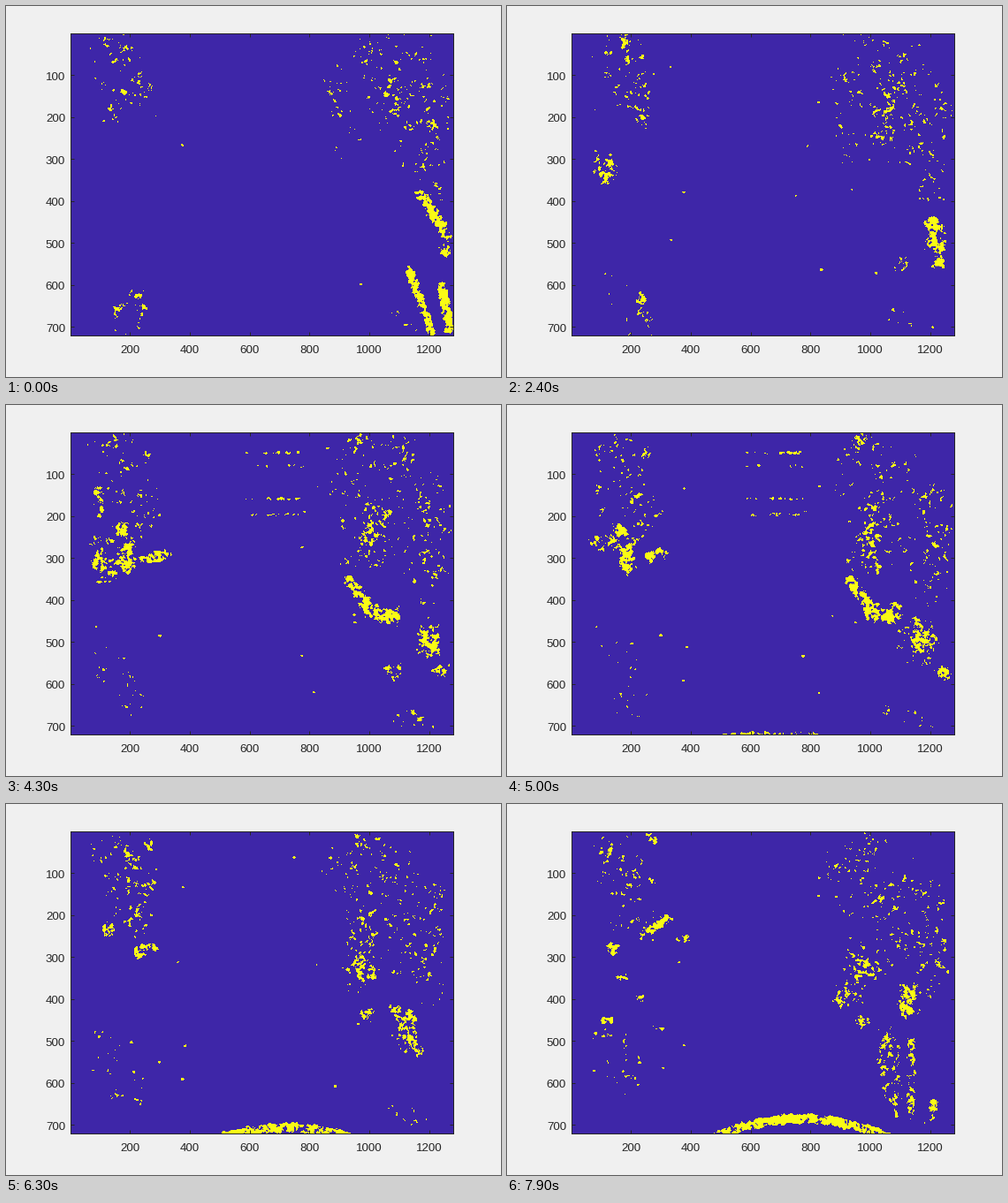
A matplotlib script for the animation above (8 s loop, 560 px wide and 420 px high).

```python
import numpy as np
import matplotlib.pyplot as plt
from matplotlib.animation import FuncAnimation
from matplotlib.colors import ListedColormap
from matplotlib.transforms import ScaledTranslation

FRAMES, STEP, END = 80, 100, 8
LEFT, TOP, W, H = 73, 31, 433, 342
FADE = 0.6      # seconds a patch needs to appear or vanish
DRIFT = 0.9     # seconds between independent noise fields

plt.rcParams["font.family"] = "Liberation Sans"
rng = np.random.default_rng(12)
xs = np.arange(W) + LEFT + .5
ys = np.arange(H) + TOP + .5
patches = []


def patch(t0, t1, path, r, d, tail=(0, 0), fade=FADE):
    """Rounded patch of density d whose start runs evenly along path."""
    patches.append((t0, t1, np.array(path, float), r, d, tail, fade))


def smooth(u):
    u = np.clip(u, 0, 1)
    return u * u * (3 - 2 * u)


# loose speckle on both sides
patch(0, END, [(432, 60), (405, 75)], 42, .05, tail=(45, 75))
patch(0, END, [(448, 65), (393, 165)], 16, .16, tail=(-8, 50))
patch(0, END, [(480, 100)], 16, .06, tail=(0, 110))
patch(0, END, [(375, 85), (388, 95)], 15, .03, tail=(15, 85))
patch(0, END, [(435, 350)], 9, .05, tail=(40, 8))
patch(0, END, [(122, 45), (125, 60)], 24, .06, tail=(25, 70))
patch(0, END, [(125, 335), (115, 260)], 20, .025, tail=(25, 50))

# right side
patch(0, .6, [(469, 212)], 5.5, .8, tail=(31, 50))
patch(0, .6, [(456, 300)], 4.5, .85, tail=(25, 68))
patch(0, .4, [(494, 318)], 5, .9, tail=(8, 48))
patch(.9, END, [(490, 236), (482, 255), (477, 256), (454, 246), (455, 212)],
      11, .6, tail=(2, 18))
patch(0, 5.2, [(495, 278), (489, 291), (494, 305)], 7.5, .6)
patch(.7, 4.2, [(456, 297), (448, 293), (440, 300)], 9, .45)
patch(3, 6.8, [(399, 40)], 7, .32, tail=(2, 8))
patch(3.3, 5.3, [(389, 199)], 6, .72, tail=(23, 32))
patch(4.4, 5.5, [(412, 235)], 8.5, .8, tail=(26, 5))
patch(3, END, [(416, 246), (412, 236), (402, 248)], 7, .5)
patch(4.8, END, [(438, 226), (442, 236), (450, 215)], 7, .5)
patch(4.9, 6.3, [(450, 258)], 14, .12, tail=(18, 25))
patch(5.8, END, [(395, 185)], 11, .38, tail=(16, 4))
patch(7.3, END, [(457, 268)], 4, .45, tail=(0, 82))
patch(7.3, END, [(430, 265)], 11, .15, tail=(8, 85))
patch(7.3, END, [(483, 338)], 4.5, .7, tail=(0, 6))

# left side
patch(0, 2.4, [(132, 38)], 7, .25, tail=(4, 8))
patch(0, 3, [(152, 328)], 6, .25, tail=(2, 25))
patch(1.9, 4, [(110, 174)], 10, .62, tail=(4, 17))
patch(2.9, 4.6, [(104, 96)], 5, .4, tail=(2, 26))
patch(3.2, 4.2, [(98, 179)], 4, .55, tail=(78, -5))
patch(3, END, [(126, 136), (132, 142), (116, 144), (118, 164)], 7.5, .65)
patch(4.4, 5.6, [(134, 162)], 8, .75, tail=(3, 20))
patch(4.6, 5.4, [(102, 155)], 8, .3, tail=(38, 2))
patch(3.5, 6.6, [(170, 173), (164, 171), (148, 166)], 6.5, .75, tail=(12, -3))
patch(4.6, END, [(157, 56), (164, 38)], 6, .38)
patch(5.8, END, [(164, 92), (160, 90)], 6, .4)
patch(7.2, END, [(162, 142)], 5, .6, tail=(20, -13))
for x, y in ((148, 221), (110, 245), (168, 253), (196, 153), (128, 196)):
    patch(7.3, END, [(x, y)], 4, .5, tail=(6, 0))

# rows of dots in the upper centre
for y in (54, 69, 106, 124):
    patch(3.3, 5.1, [(272, y)], 1.6, .25, tail=(64, 0), fade=.3)

# short-lived single specks beside the empty middle
for _ in range(80):
    x = rng.choice([rng.uniform(95, 208), rng.uniform(325, 420)])
    y, born = rng.uniform(40, 330), rng.uniform(-1, END)
    patch(born, born + rng.uniform(.5, 2), [(x, y)], 1.2, .9, tail=(1, 0), fade=.2)


def blur(field, sigma):
    fy = np.fft.fftfreq(H)[:, None]
    fx = np.fft.fftfreq(W)[None, :]
    low = np.exp(-2 * (np.pi * sigma) ** 2 * (fx ** 2 + fy ** 2))
    out = np.fft.ifft2(np.fft.fft2(field) * low).real
    return out / out.std()


def grain():
    a, b, c = rng.standard_normal((3, H, W))
    mix = .8 * blur(a, 1.0) + .55 * blur(b, 2.4) + .25 * c
    return mix / mix.std()


grains = [grain() for _ in range(int(END / DRIFT) + 2)]
levels = np.linspace(0, 1, 1001)
cuts = np.quantile(grains[0], levels)


def stamp(out, t, t0, t1, path, r, d, tail, fade):
    gap = max(t0 - t, t - t1, 0)
    if gap >= fade:
        return
    d *= smooth(1 - gap / fade)
    when = np.linspace(t0, t1, len(path))
    x, y = (np.interp(t, when, c) for c in path.T)
    dx, dy = tail
    pad = 1.6 * r
    i0, i1 = np.searchsorted(xs, (x + min(dx, 0) - pad, x + max(dx, 0) + pad))
    j0, j1 = np.searchsorted(ys, (y + min(dy, 0) - pad, y + max(dy, 0) + pad))
    px, py = xs[None, i0:i1] - x, ys[j0:j1, None] - y
    u = np.clip((px * dx + py * dy) / (dx * dx + dy * dy + 1e-9), 0, 1)
    q = ((px - u * dx) ** 2 + (py - u * dy) ** 2) / r ** 2
    part = out[j0:j1, i0:i1]
    np.maximum(part, d * np.exp(-q * q), out=part)


def mound(t):
    """Parabolic band that rises from the bottom edge and widens."""
    age = t - 5
    u = (xs - 305 - 9.5 * age) / (55 + 16 * age)
    top = TOP + H - (3 + 6.6 * age) * (1 - u ** 2)
    depth = ys[:, None] - top
    return .85 * smooth(.6 + age) * smooth((depth + 2) / 4) * smooth((13 - depth) / 4)


def mask(t):
    dens = np.zeros((H, W))
    for p in patches:
        stamp(dens, t, *p)
    if t > 4.6:
        dens = np.maximum(dens, mound(t))
    k, a = divmod(t / DRIFT, 1)
    k, a = int(k), a * np.pi / 2
    noise = np.cos(a) * grains[k] + np.sin(a) * grains[k + 1]
    return (dens > .002) & (noise > np.interp(1 - dens, levels, cuts))


fig = plt.figure(figsize=(5.6, 4.2), dpi=100, facecolor="#f0f0f0")
ax = fig.add_axes([LEFT / 560, 1 - (TOP + H) / 420, W / 560, H / 420])
image = ax.imshow(mask(0), cmap=ListedColormap(["#3e26a8", "#f9fb15"]),
                  vmin=0, vmax=1, interpolation="nearest", aspect="auto",
                  extent=(.5, 1280.5, 720.5, .5))
ax.set_xticks(range(200, 1201, 200))
ax.set_yticks(range(100, 701, 100))
ax.tick_params(direction="in", length=3.1, width=.72, color="#262626",
               labelcolor="#262626", labelsize=9.6, top=True, right=True)
ax.tick_params(axis="x", pad=7.9)
ax.tick_params(axis="y", pad=4.3)
drop = ScaledTranslation(0, -1 / 100, fig.dpi_scale_trans)
for label in ax.get_yticklabels():
    label.set_transform(label.get_transform() + drop)
for spine in ax.spines.values():
    spine.set(color="#262626", linewidth=.72)


def update(i):
    image.set_data(mask(i * STEP / 1000))
    return [image]


anim = FuncAnimation(fig, update, frames=FRAMES, interval=STEP,
                     repeat=True, repeat_delay=0)
plt.show()
```
